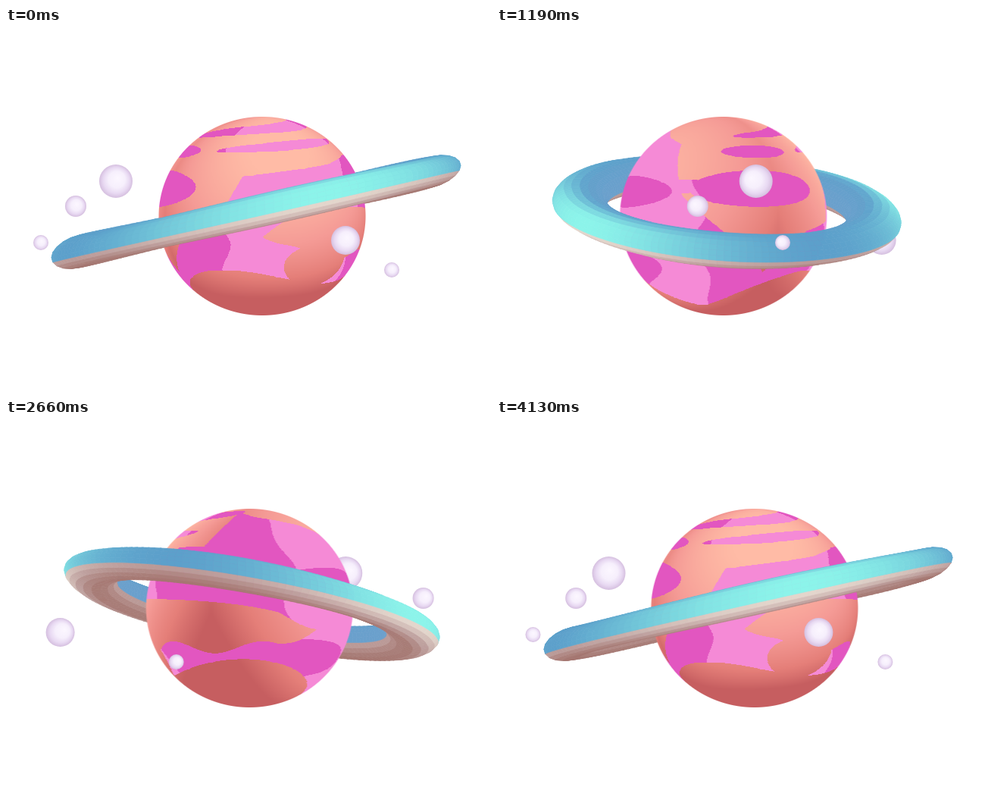
Write an HTML page with a canvas that moves like this. It is 640 by 480 pixels and loops after 4.2 s.

```html
<!DOCTYPE html>
<html lang="en">
<head>
<meta charset="utf-8">
<title>Ringed planet</title>
<style>
html, body { margin: 0; width: 100%; height: 100%; overflow: hidden; background: #fff; }
canvas { display: block; }
</style>
</head>
<body>
<canvas id="stage" width="640" height="480"></canvas>
<script>
const LOOP = 4200, STEP = 70, TAU = Math.PI * 2, RAD = Math.PI / 180;
const LIGHT = 20; // longitude of the main light; a second one stands opposite
const ctx = document.getElementById('stage').getContext('2d');

const clamp = (v, lo = 0, hi = 1) => Math.min(hi, Math.max(lo, v));
const mix = (a, b, k) => a.map((v, i) => v + (b[i] - v) * k);
const rgb = c => `rgb(${c.map(Math.round)})`;
const cosd = deg => Math.cos(deg * RAD);

// Value at v on a line through [position, value] points; values are arrays.
function ramp(stops, v) {
  let i = 1;
  while (i < stops.length - 1 && v > stops[i][0]) i++;
  const [p, a] = stops[i - 1], [q, b] = stops[i];
  return mix(a, b, clamp((v - p) / (q - p)));
}

// ---- Planet surface: longitude in degrees, height as stage y ----
const TOP = 117, RX = 136.5, RY = 131, MID_Y = 248;
const TEX_W = 1440, TEX_H = 524;

// Oval patch, optionally slanted, on the wrapped surface.
function oval(lon, y, cx, cy, w, h, slant = 0) {
  const dx = (lon - cx + 540) % 360 - 180;
  return Math.hypot(dx / w, (y - cy - slant * dx) / h) < 1;
}

const coast = [
  [-21, [235]], [-12, [196]], [44, [181]], [75, [168]], [98, [167]], [112, [122]],
  [185, [137]], [222, [153]], [234, [222]], [285, [322]], [312, [268]], [339, [255]]
];

// Rock-coloured tongue cut into the pink land.
function inTongue(lon, y) {
  const p = lon / 174;
  if (p > 1) return false;
  const open = Math.min(1, 8 * p * (1 - p));
  const upper = 276 - 40 * open + 40 * p ** 5 * open;
  const lower = 276 + open * (24 + 8 * cosd(6 * (lon - 110)));
  return y > upper && y < lower || oval(lon, y, 38, 313, 24, 28);
}

function isPink(lon, y) {
  const south = 335 + 14 * cosd(lon - 238) + 16 * cosd(2 * (lon - 50));
  const north = ramp(coast, lon > 339 ? lon - 360 : lon)[0];
  return y > north && y < south && !inTongue(lon, y)
    || oval(lon, y, 278, 212, 40, 24)
    || oval(lon, y, 232, 209, 26, 9)
    || oval(lon, y, 15, 132, 108, 6, -.1)
    || oval(lon, y, 22, 155, 58, 6, -.13)
    || oval(lon, y, 282, 163, 26, 8);
}

const isMagenta = (lon, y) => Math.abs(cosd(lon - LIGHT)) < .72 + .06 * Math.sin(y / 14)
  || oval(lon, y, 160, 314, 54, 25) || oval(lon, y, 185, 216, 42, 21);

const rock = [[-.12, [198, 94, 96]], [.12, [229, 127, 121]], [.42, [245, 155, 150]], [.78, [255, 187, 166]]];
const PINK = [245, 138, 214], MAGENTA = [226, 86, 192];

function surfaceColor(lon, y) {
  if (isPink(lon, y)) return isMagenta(lon, y) ? MAGENTA : PINK;
  const up = (MID_Y - y) / RY, flat = Math.sqrt(1 - up * up), c = cosd(lon - LIGHT);
  const side = .6 * Math.abs(c) - .1 * cosd(lon - LIGHT - 90);
  return ramp(rock, side * flat + up * (.3 + .27 * Math.max(0, c)));
}

const pack = ([r, g, b]) => 255 << 24 | b << 16 | g << 8 | r;
const surface = Uint32Array.from({ length: TEX_W * TEX_H }, (_, i) =>
  pack(surfaceColor(i % TEX_W / TEX_W * 360, TOP + (Math.floor(i / TEX_W) + .5) / TEX_H * 2 * RY)));

const PW = 280, PH = 266;
const globe = Object.assign(document.createElement('canvas'), { width: PW, height: PH }).getContext('2d');
const globeImage = globe.createImageData(PW, PH);
const globePixels = new Uint32Array(globeImage.data.buffer);

// Per pixel: offset, texture row, column at rest, edge alpha.
const lookup = [];
for (let y = 0; y < PH; y++) for (let x = 0; x < PW; x++) {
  const nx = (x + .5 - PW / 2) / RX, ny = (y + .5 - PH / 2) / RY, r = Math.hypot(nx, ny);
  const alpha = clamp((1 - r) * RY + .5);
  if (!alpha) continue;
  const row = Math.floor(clamp((ny + 1) / 2, 0, .9999) * TEX_H) * TEX_W;
  const lon = Math.atan2(nx, Math.sqrt(Math.max(0, 1 - r * r)));
  lookup.push([y * PW + x, row, lon / TAU * TEX_W, Math.round(alpha * 255) << 24]);
}

function drawGlobe(cx, angle) {
  const turn = TEX_W * (2 - angle / TAU);
  for (const [i, row, col, alpha] of lookup)
    globePixels[i] = surface[row + Math.floor(col + turn) % TEX_W] & 0xffffff | alpha;
  globe.putImageData(globeImage, 0, 0);
  ctx.drawImage(globe.canvas, cx - PW / 2, MID_Y - PH / 2);
}

// ---- Ring: sheared flat torus ----
const NU = 144, NV = 20, RING_Y = 242, TILT = .225;

function ringPoint(i, j) {
  const u = i / NU * TAU, v = j / NV * TAU, wide = 36 * Math.cos(v);
  const x = (234 + wide) * Math.sin(u), z = (192 + wide) * Math.cos(u);
  const thick = 20.5 + 1.3 * Math.sin(3 * u + 1);
  return [x + 10, RING_Y - TILT * x - thick * Math.sin(v), z - 15];
}

function ringColor(i, j) {
  const u = (i + .5) / NU * TAU, v = (j + .5) / NV * TAU, s = Math.sin(v), out = Math.cos(v);
  const glow = Math.cos(u - LIGHT * RAD) ** 2 * clamp(.25 + out);
  if (s > -.2) {
    const blue = mix([92, 160, 203], [140, 244, 234], glow);
    return mix(blue, [140, 160, 206], .3 * Math.max(0, -out));
  }
  return ramp([[0, [164, 118, 112]], [.45, [190, 160, 158]], [1, [228, 216, 206]]], .6 * glow + .7 * (1 + s));
}

const ringGrid = [], ringColors = [];
for (let i = 0; i < NU; i++) for (let j = 0; j < NV; j++) {
  ringGrid.push(ringPoint(i, j));
  ringColors.push(rgb(ringColor(i, j)));
}

function drawQuad([a, ...rest], color) {
  ctx.fillStyle = ctx.strokeStyle = color;
  ctx.beginPath();
  ctx.moveTo(a[0], a[1]);
  for (const p of rest) ctx.lineTo(p[0], p[1]);
  ctx.closePath();
  ctx.fill();
  ctx.stroke();
}

// ---- Moons: x and depth at rest, height, radius ----
const moons = [
  [-175, -15, 202, 22], [-228, -105, 235, 14], [-274, 0, 283, 10],
  [128, 219, 280, 19], [189, -42, 319, 10]
];

function drawMoon(x, y, r, lightX) {
  const g = ctx.createRadialGradient(x + .35 * r * lightX, y - .2 * r, 0, x, y, r);
  g.addColorStop(0, '#fcf7ff');
  g.addColorStop(.5, '#f6effc');
  g.addColorStop(.78, '#e8d9f2');
  g.addColorStop(1, '#d5bfdf');
  ctx.fillStyle = g;
  ctx.beginPath();
  ctx.arc(x, y, r, 0, TAU);
  ctx.fill();
}

function draw(time) {
  const angle = time / LOOP * TAU, cos = Math.cos(angle), sin = Math.sin(angle);
  const spin = (x, z) => [320 + x * cos + z * sin, z * cos - x * sin];
  const items = [];

  const pts = ringGrid.map(([x, y, z]) => {
    const [sx, depth] = spin(x, z);
    return [sx, y, depth];
  });
  for (let i = 0; i < NU; i++) for (let j = 0; j < NV; j++) {
    const i2 = (i + 1) % NU * NV, j2 = (j + 1) % NV;
    const quad = [pts[i * NV + j], pts[i2 + j], pts[i2 + j2], pts[i * NV + j2]];
    const [a, b, c, d] = quad;
    const facing = (c[0] - a[0]) * (d[1] - b[1]) - (c[1] - a[1]) * (d[0] - b[0]);
    if (facing < 0) items.push([(a[2] + c[2]) / 2, () => drawQuad(quad, ringColors[i * NV + j])]);
  }

  const lit = angle + LIGHT * RAD;
  const lightX = Math.sin(lit) * Math.sign(Math.cos(lit));
  for (const [x, z, y, r] of moons) {
    const [sx, depth] = spin(x, z);
    items.push([depth, () => drawMoon(sx, y, r, lightX)]);
  }
  items.push([0, () => drawGlobe(spin(18, -18)[0], angle)]);

  ctx.fillStyle = '#fff';
  ctx.fillRect(0, 0, 640, 480);
  ctx.lineWidth = .7;
  items.sort((a, b) => a[0] - b[0]).forEach(item => item[1]());
}

const start = performance.now();
function tick() {
  const t = (performance.now() - start) % LOOP;
  draw(Math.floor(t / STEP) * STEP);
  requestAnimationFrame(tick);
}
tick();
</script>
</body>
</html>
```
